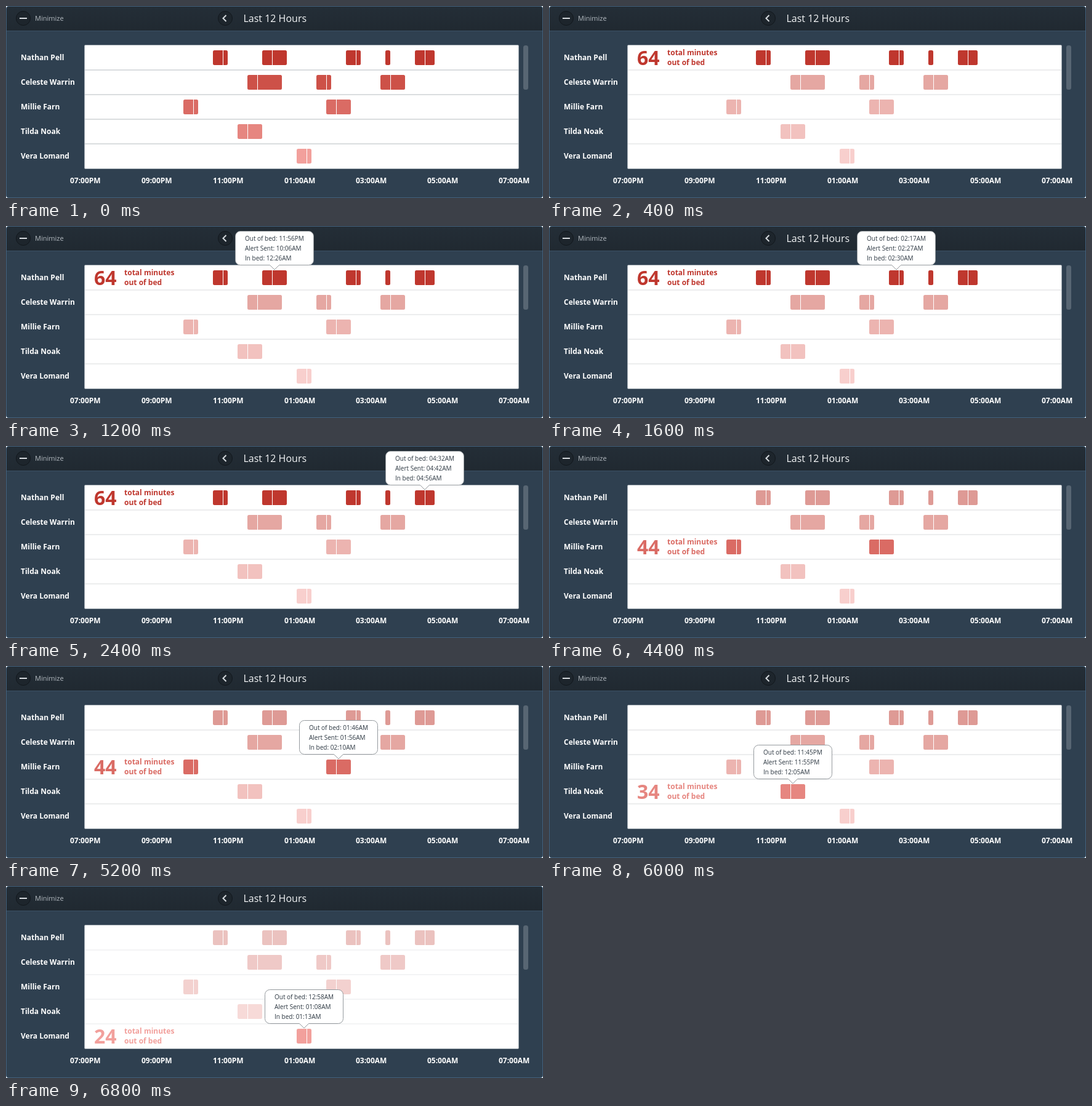
Write an HTML page that moves like this. It is 872 by 312 pixels and loops after 7.2 s.

```html
<!DOCTYPE html>
<html lang="en">
<head>
<meta charset="utf-8">
<title>Last 12 Hours</title>
<style>
  html, body { margin: 0; width: 100%; height: 100%; overflow: hidden; background: #fff; }
  svg { display: block; font-family: "Open Sans", sans-serif; }
  .bold { font-size: 12px; font-weight: 700; }
  .light { fill: #fff; }
  .total { font-size: 32px; font-weight: 700; }
  .tip { font-size: 10px; fill: #2b3640; }
</style>
</head>
<body>
<svg id="stage" width="872" height="312" viewBox="0 0 872 312">
  <defs>
    <linearGradient id="bar" x1="0" y1="0" x2="0" y2="1">
      <stop offset="0" stop-color="#242e37"/>
      <stop offset="1" stop-color="#202931"/>
    </linearGradient>
  </defs>
  <rect x=".5" y=".5" width="871" height="311" rx="3.5" fill="#2f4050"/>
  <path d="M1 40V4a3 3 0 0 1 3-3h864a3 3 0 0 1 3 3v36z" fill="url(#bar)"/>
  <path d="M1 40.5h870" stroke="#3c5165"/>
  <rect x=".5" y=".5" width="871" height="311" rx="3.5" fill="none" stroke="#43617c"/>
  <g fill="#1d252c" stroke="#12181d">
    <circle cx="28" cy="20" r="11.5"/>
    <circle cx="356" cy="20" r="11.5"/>
  </g>
  <path d="M22 20h12M357.500 15l-5 5 5 5" fill="none" stroke="#d5dade" stroke-width="2"/>
  <text x="47" y="24" font-size="11" fill="#b4bbc1">Minimize</text>
  <text x="385.500" y="26" font-size="16" fill="#f4f6f7">Last 12 Hours</text>
  <rect x="127.500" y="63.500" width="705" height="201" rx="1.500" fill="#fff" stroke="#9aa4ac"/>
  <rect x="840" y="64" width="8" height="72" rx="3.500" fill="#586673"/>
</svg>
<script>
const STEP = 400;
const stage = document.getElementById("stage");

// Each block: x, width, out of bed, alert sent, in bed
const rows = [
  { name: "Nathan Pell", total: 64, color: "#bf372e", blocks: [
    [336, 24, "10:35PM", "10:45PM", "10:48PM"],
    [416, 40, "11:56PM", "10:06AM", "12:26AM"],
    [552, 24, "02:17AM", "02:27AM", "02:30AM"],
    [616, 8, "03:24AM", "None", "03:29AM"],
    [664, 32, "04:32AM", "04:42AM", "04:56AM"]] },
  { name: "Celeste Warrin", total: 54, color: "#cd5148", blocks: [
    [392, 56, "11:33PM", "11:43PM", "12:05AM"],
    [504, 24, "01:15AM", "01:25AM", "01:28AM"],
    [608, 40, "03:17AM", "03:27AM", "03:40AM"]] },
  { name: "Millie Farn", total: 44, color: "#da6b64", blocks: [
    [288, 24, "09:46PM", "09:56PM", "10:00PM"],
    [520, 40, "01:46AM", "01:56AM", "02:10AM"]] },
  { name: "Tilda Noak", total: 34, color: "#e68680", blocks: [
    [376, 40, "11:45PM", "11:55PM", "12:05AM"]] },
  { name: "Vera Lomand", total: 24, color: "#f2a09c", blocks: [
    [472, 24, "12:58AM", "01:08AM", "01:13AM"]] }
];

function add(parent, tag, attrs = {}, text = "") {
  const el = document.createElementNS("http://www.w3.org/2000/svg", tag);
  for (const key in attrs) el.setAttribute(key, attrs[key]);
  el.textContent = text;
  return parent.appendChild(el);
}

const lines = add(stage, "g", { fill: "#dadddf" });
for (let y = 103; y < 240; y += 40) add(lines, "rect", { x: 128, y, width: 704, height: 2 });

["07:00PM", "09:00PM", "11:00PM", "01:00AM", "03:00AM", "05:00AM", "07:00AM"].forEach((label, i) =>
  add(stage, "text", { x: 104 + 116 * i, y: 288, class: "bold light" }, label));

rows.forEach((row, i) => {
  const top = 64 + 40 * i;
  add(stage, "text", { x: 24, y: top + 24, class: "bold light" }, row.name);

  row.bars = add(stage, "g", { fill: row.color });
  for (const [x, width] of row.blocks) {
    add(row.bars, "rect", { x, y: top + 8, width, height: 24, rx: 2.5 });
    if (width > 16) add(row.bars, "rect", { x: x + 16, y: top + 8, width: 1, height: 24, fill: "#fff" });
  }

  row.summary = add(stage, "g", { fill: row.color });
  add(row.summary, "text", { x: 143, y: top + 32, class: "total" }, row.total);
  add(row.summary, "text", { x: 192, y: top + 16, class: "bold" }, "total minutes");
  add(row.summary, "text", { x: 192, y: top + 32, class: "bold" }, "out of bed");
});

// The origin of the bubble is the tip of its arrow
const bubble = add(stage, "g");
add(bubble, "path", {
  d: "M-55.500-63.500h111a8 8 0 0 1 8 8v39a8 8 0 0 1-8 8H7.500L0-1l-7.500-7.500h-48a8 8 0 0 1-8-8v-39a8 8 0 0 1 8-8z",
  fill: "#fff", stroke: "#959a9e"
});
const tipLines = [-48, -32, -16].map(y => add(bubble, "text", { x: -48, y, class: "tip" }));

// Overview first, then each row on its own followed by its blocks
const steps = [{ row: -1 }];
rows.forEach((r, row) => {
  steps.push({ row });
  for (const block of r.blocks) steps.push({ row, block });
});

function show({ row, block }) {
  const dim = row < 0 ? 1 : row === rows.length - 1 ? 0.3 : 0.5;
  lines.setAttribute("opacity", dim);
  rows.forEach((r, i) => {
    r.bars.setAttribute("opacity", i === row ? 1 : dim);
    r.summary.setAttribute("visibility", i === row ? "visible" : "hidden");
  });
  bubble.setAttribute("visibility", block ? "visible" : "hidden");
  if (!block) return;
  const [x, width, out, alert, back] = block;
  bubble.setAttribute("transform", `translate(${x + width / 2} ${72 + 40 * row})`);
  [`Out of bed: ${out}`, `Alert Sent: ${alert}`, `In bed: ${back}`]
    .forEach((text, i) => tipLines[i].textContent = text);
}

let current = -1;
function tick() {
  const next = Math.floor(performance.now() / STEP) % steps.length;
  if (next !== current) show(steps[current = next]);
  requestAnimationFrame(tick);
}
tick();
</script>
</body>
</html>
```
